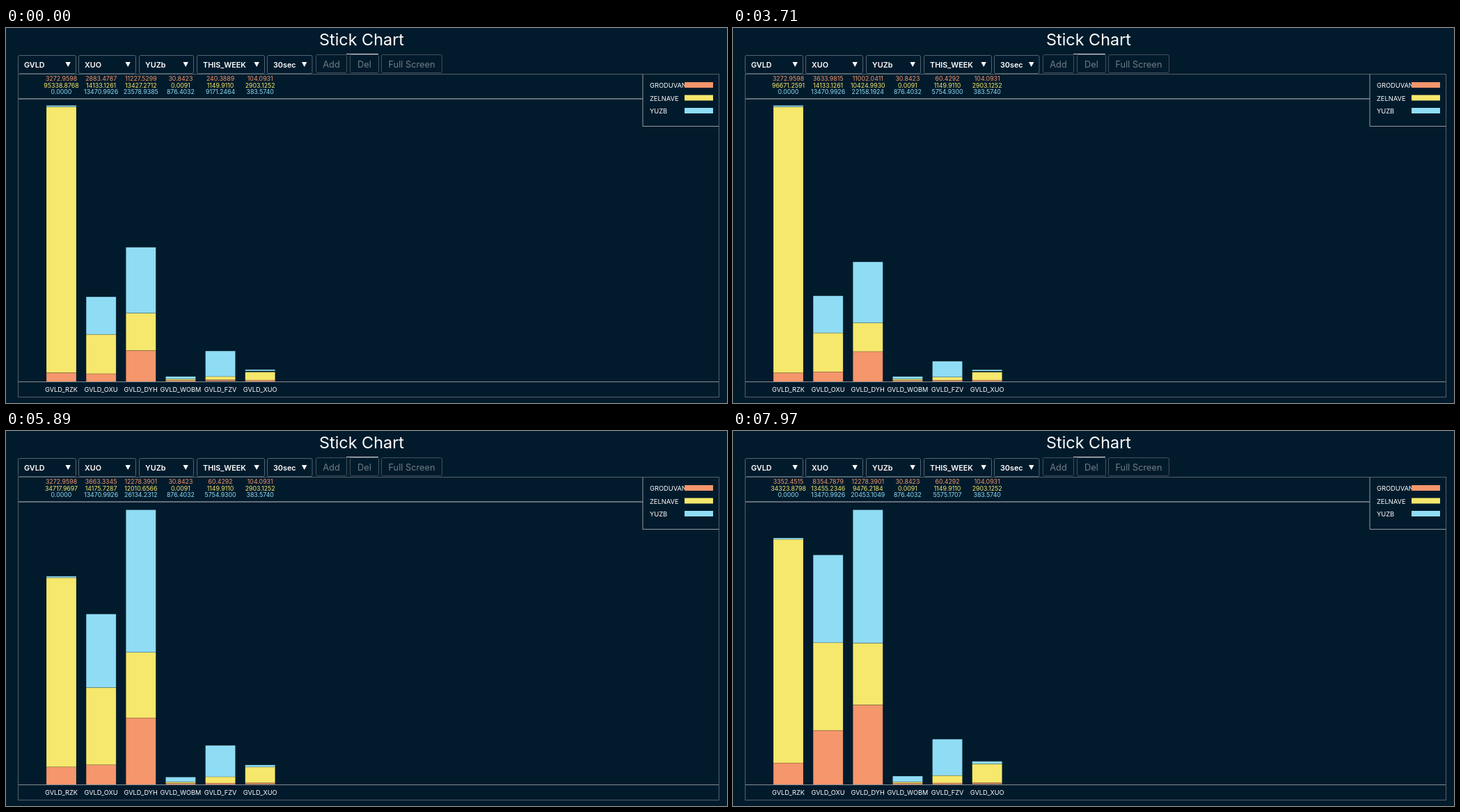
Recreate the animation shown at these times as an HTML page. Size 1036x540 px, loop 8 s.

```html
<!DOCTYPE html>
<html lang="en">
<head>
<meta charset="utf-8">
<title>Stick Chart</title>
<style>
  html, body { margin: 0; width: 100%; height: 100%; overflow: hidden; background: #021b2c; }
  svg { display: block; width: 1036px; height: 540px; font-family: Inter, "Open Sans", sans-serif; }
</style>
</head>
<body>
<svg id="stage" viewBox="0 0 1036 540"></svg>
<script>
const LOOP = 8000;
const BASE = 509.5, FULL = 396, MIN = 2;
const COLUMN = 57.14, BAR = 43;
const COLORS = ['#f5966c', '#f6e86c', '#8fdcf5'];
const EXCHANGES = ['GRODUVAN', 'ZELNAVE', 'YUZB'];
const QUOTE = 'GVLD';

// A volume that jumps to its next value at a steady beat, first at `first` ms.
const beat = (first, step, ...values) => time => {
  const jumps = Math.max(0, Math.floor((time - first) / step) + 1);
  return values[Math.min(jumps, values.length - 1)];
};
const still = value => () => value;

// Traded volume of each coin, one rule for each exchange.
const COINS = {
  RZK: [
    beat(6330, LOOP, 3272.9598, 3352.4515),
    beat(2110, 1890, 95338.8768, 96671.2591, 63606.0559, 34717.9697, 34323.8798),
    still(0)
  ],
  OXU: [
    beat(3700, 1400, 2883.4787, 3633.9815, 3663.3345, 3060.9448, 8354.7879),
    beat(3900, 4000, 14133.1261, 14175.7287, 13455.2346),
    still(13470.9926)
  ],
  DYH: [
    beat(640, 4700, 11227.5299, 11002.0411, 12278.3901),
    beat(1900, 1200, 13427.2712, 12683.6049, 10424.993, 11372.4335, 12010.6566, 10878.2552, 9476.2184),
    beat(2060, 1950, 23578.9385, 22158.1924, 26134.2312, 23010.6434, 20453.1049)
  ],
  WOBM: [still(30.8423), still(0.0091), still(876.4032)],
  FZV: [
    beat(2500, LOOP, 240.3889, 60.4292),
    still(1149.911),
    beat(2500, 4000, 9171.2464, 5754.93, 5575.1707)
  ],
  XUO: [still(104.0931), still(2903.1252), still(383.574)]
};

const stage = document.getElementById('stage');

function add(tag, attrs, content = '') {
  const node = document.createElementNS('http://www.w3.org/2000/svg', tag);
  for (const key in attrs) node.setAttribute(key, attrs[key]);
  node.textContent = content;
  return stage.appendChild(node);
}
const label = (content, x, y, size, fill, more) =>
  add('text', { x, y, 'font-size': size, fill, ...more }, content);
const outline = (x, y, width, height, stroke, rx = 0) =>
  add('rect', { x, y, width, height, rx, stroke, fill: 'none' });
const line = (d, stroke) => add('path', { d, stroke, fill: 'none' });
const centered = { 'text-anchor': 'middle' };

function drawSelect(name, x, width) {
  outline(x, 39.5, width, 26, '#536471', 2);
  label(name, x + 8.5, 57.3, 10.8, '#fff', { 'font-weight': 600 });
  add('path', { d: `M${x + width - 15} 49h7.4l-3.7 7z`, fill: '#fff' });
}

function drawButton(name, x, width) {
  outline(x, 38.5, width, 26, '#41515d', 2);
  label(name, x + width / 2, 57, 12.8, '#707d86', centered);
}

function drawControls() {
  label('Stick Chart', 511, 25.3, 23.4, '#fff', centered);
  drawSelect(QUOTE, 17.5, 83);
  drawSelect('XUO', 104.5, 82);
  drawSelect('YUZb', 191.5, 78);
  drawSelect('THIS_WEEK', 274.5, 97);
  drawSelect('30sec', 375.5, 64.5);
  drawButton('Add', 445.5, 44);
  drawButton('Del', 494.5, 41);
  drawButton('Full Screen', 539.5, 87);
  line('M489 37.5H535', '#d5d8da');
}

function drawFrame() {
  outline(17.5, 66.5, 1007, 465, '#52616d');
  line('M18 102H915', '#c4c1c6');
  line('M915 66.5V141.5H1024.5', '#929aa0');
  EXCHANGES.forEach((name, i) => {
    const y = 78 + i * 18.5;
    label(name, 925, y + 8, 9.3, '#fff');
    add('rect', { x: 975, y, width: 41, height: 8, fill: COLORS[i] });
  });
}

const columns = Object.entries(COINS).map(([coin, volumes], i) => {
  const center = 79.5 + i * COLUMN;
  label(`${QUOTE}_${coin}`, center, 523.5, 9.2, '#fff', centered);
  return volumes.map((volume, k) => ({
    volume,
    bar: add('rect', {
      x: center - BAR / 2, width: BAR, fill: COLORS[k],
      stroke: '#000', 'stroke-opacity': .35, 'stroke-width': .5
    }),
    number: label('', center, 76.3 + k * 9.2, 8.8, COLORS[k], centered)
  }));
});

drawControls();
drawFrame();
line('M18 509.5H1024', '#858d93');

function render(time) {
  const rows = columns.map(column => column.map(cell => cell.volume(time)));
  const largest = Math.max(...rows.map(row => row.reduce((a, b) => a + b)));
  rows.forEach((row, i) => {
    let top = BASE;
    row.forEach((value, k) => {
      const { bar, number } = columns[i][k];
      const height = value / largest * FULL;
      // Thin segments are lifted and drawn at the minimum height.
      top -= height < MIN ? height + MIN : height;
      bar.setAttribute('y', top);
      bar.setAttribute('height', Math.max(height, MIN));
      number.textContent = value.toFixed(4);
    });
  });
}

const begin = performance.now();
function tick() {
  render((performance.now() - begin) % LOOP);
  requestAnimationFrame(tick);
}
tick();
</script>
</body>
</html>
```
